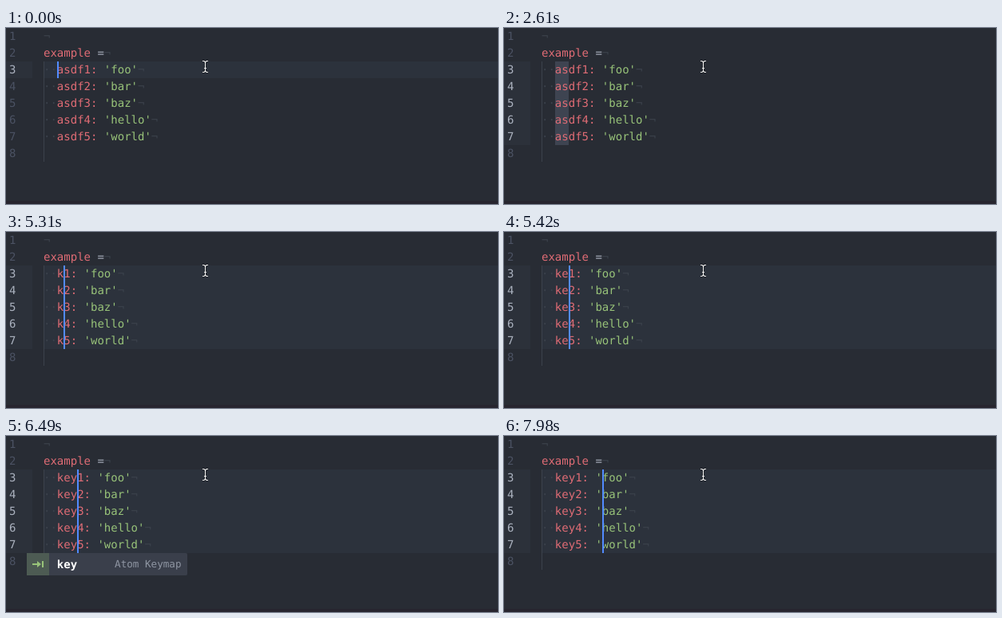
Recreate the animation shown at these times as an HTML page with a canvas. Size 616x221 px, loop 8000 ms.

```html
<!DOCTYPE html>
<html lang="en">
<head>
<meta charset="utf-8">
<title>Multiple cursors in a code editor</title>
<style>
  html, body { margin: 0; width: 100%; height: 100%; overflow: hidden; background: #282c34; }
  canvas { display: block; }
</style>
</head>
<body>
<canvas id="stage" width="616" height="221"></canvas>
<script>
const ctx = document.getElementById('stage').getContext('2d');
const LOOP = 8000, LINE = 21, CHAR = 8.428, LEFT = 47;
const FACE = '"DejaVu Sans Mono", monospace';
const RED = '#e06c75', GREEN = '#98c379', PLAIN = '#abb2bf', FAINT = '#3c424c';
const values = ['foo', 'bar', 'baz', 'hello', 'world'];

// Each entry changes part of the editor state at its time.
const steps = [
  [0, { last: 3, key: 'asdf', col: 2, caret: true, selected: 0, popup: '' }],
  [300, { caret: false }],
  [480, { caret: true, last: 4 }],
  [780, { last: 5 }],
  [1010, { last: 6 }],
  [1370, { last: 7 }],
  [1840, { caret: false }],
  [2260, { caret: true }],
  [2370, { caret: false, selected: 1 }],
  [2610, { selected: 2 }],
  [2850, { selected: 3 }],
  [3150, { selected: 4 }],
  [5310, { selected: 0, key: 'k', col: 3, caret: true }],
  [5420, { key: 'ke', col: 4 }],
  [5510, { popup: 'ke' }],
  [5600, { key: 'key', col: 5 }],
  [5660, { popup: 'key' }],
  [6070, { caret: false }],
  [6490, { caret: true }],
  [6900, { caret: false, popup: '' }],
  [7260, { caret: true }],
  [7320, { col: 6 }],
  [7560, { col: 7 }],
  [7740, { col: 8 }],
  [7980, { col: 9 }]
];

const stateAt = t => Object.assign({}, ...steps.filter(s => s[0] <= t).map(s => s[1]));
const columnX = col => LEFT + col * CHAR;
const lineTop = n => (n - 1) * LINE;

function rect(x, y, w, h, color) {
  ctx.fillStyle = color;
  ctx.fillRect(x, y, w, h);
}

function text(str, x, y, color, size = 14, weight = 'normal') {
  ctx.font = `${weight} ${size}px ${FACE}`;
  ctx.fillStyle = color;
  ctx.fillText(str, x, y);
}

// Writes [string, color] runs one after another on a line.
function code(n, runs) {
  let col = 0;
  for (const [str, color] of runs) {
    text(str, columnX(col), lineTop(n) + 15, color);
    col += str.length;
  }
}

function drawCode(s) {
  for (let n = 3; n <= s.last; n++) {
    rect(0, lineTop(n), 33, LINE, '#2c313a');
    if (s.selected) {
      const x = Math.round(columnX(2));
      rect(x, lineTop(n), Math.round(columnX(2 + s.selected)) - x, LINE, '#3e4451');
    } else {
      rect(LEFT, lineTop(n), 616 - LEFT, LINE, '#2c323c');
    }
  }
  for (let n = 1; n <= 8; n++) {
    const active = n >= 3 && n <= s.last;
    text(n, 4, lineTop(n) + 15, active ? PLAIN : '#4b5263');
  }
  rect(LEFT, lineTop(3), 1, 6 * LINE, FAINT);
  code(1, [['¬', FAINT]]);
  code(2, [['example ', RED], ['=', PLAIN], ['¬', FAINT]]);
  values.forEach((value, i) => code(i + 3, [
    ['··', FAINT], [`${s.key}${i + 1}: `, RED], [`'${value}'`, GREEN], ['¬', FAINT]
  ]));
  if (s.caret) {
    rect(Math.round(columnX(s.col)), lineTop(3), 2, (s.last - 2) * LINE, '#528bff');
  }
}

// Letters that match the typed prefix in order are bold and white.
function suggestion(word, kind, prefix, y, color) {
  let matched = 0;
  [...word].forEach((letter, i) => {
    const hit = letter === prefix[matched];
    if (hit) matched++;
    text(letter, columnX(2 + i), y, hit ? '#ffffff' : color, 14, hit ? 'bold' : 'normal');
  });
  text(kind, 219.5 - kind.length * 12.6 * 0.602, y - 1, color === PLAIN ? '#8f96a3' : '#6f7684', 12.6);
}

function drawPopup(prefix) {
  const rows = prefix === 'ke' ? 2 : 1;
  rect(26, 147, 201, rows * 28, '#2a2e36');
  ctx.fillStyle = '#3a3f4b';
  ctx.beginPath();
  ctx.roundRect(26, 147, 201, 28, 2);
  ctx.fill();
  rect(26, 147, 28, 28, '#4d5b53');
  rect(33, 160, 8, 2, GREEN);
  ctx.fillStyle = GREEN;
  ctx.beginPath();
  ctx.moveTo(39, 157);
  ctx.lineTo(44, 161);
  ctx.lineTo(39, 165);
  ctx.fill();
  rect(45, 157, 2, 8, GREEN);
  suggestion('key', 'Atom Keymap', prefix, 166, PLAIN);
  if (rows === 2) suggestion('package.json', 'File', prefix, 194, '#9da5b4');
}

function drawPointer() {
  const beam = new Path2D('M246 41.5h2l1.5 1.5 1.5-1.5h2M249.5 43v11M246 55.5h2l1.5-1.5 1.5 1.5h2M248 50.5h3');
  for (const [color, width] of [['#1b1e24', 2.6], ['#f4f4f4', 1.1]]) {
    ctx.strokeStyle = color;
    ctx.lineWidth = width;
    ctx.stroke(beam);
  }
}

function frame(now) {
  const s = stateAt(now % LOOP);
  ctx.textRendering = 'geometricPrecision';
  rect(0, 0, 616, 221, '#282c34');
  rect(0, 217, 616, 4, '#27252f');
  drawCode(s);
  if (s.popup) drawPopup(s.popup);
  drawPointer();
}

const start = performance.now();
function tick() {
  frame(performance.now() - start);
  requestAnimationFrame(tick);
}
tick();
</script>
</body>
</html>
```
